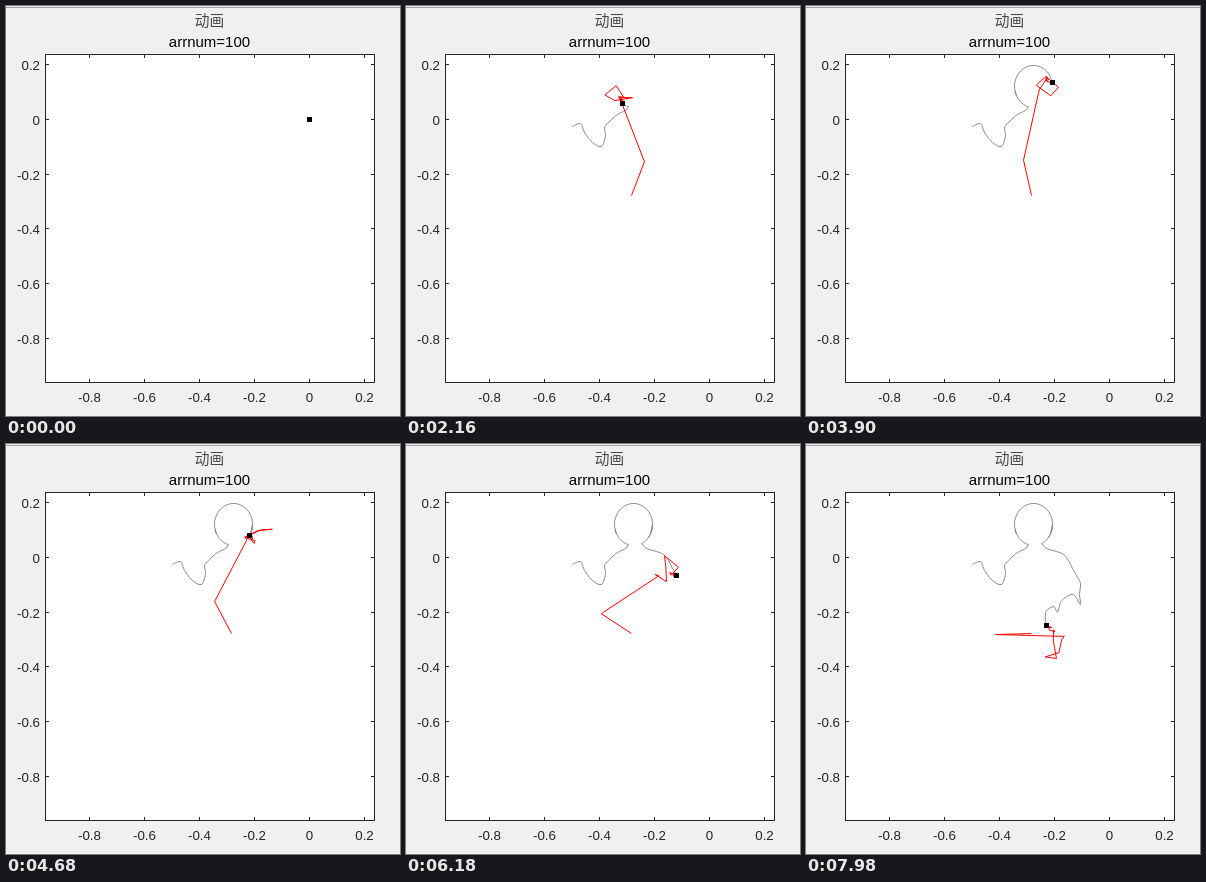
These frames come from a looping animation (394x410 px, 8000 ms). An HTML page with a canvas:

```html
<!DOCTYPE html>
<html lang="zh">
<head>
<meta charset="utf-8">
<style>
  html, body { margin: 0; width: 100%; height: 100%; overflow: hidden; background: #f0f0f0; }
  canvas { display: block; }
</style>
</head>
<body>
<canvas id="stage" width="394" height="410"></canvas>
<script>
const ctx = document.getElementById('stage').getContext('2d');
const LOOP = 8000, STEP = 60, LAST = 133;
const OMEGA = 2 * Math.PI / 310; // slowest arm, radians per step
const ORIGIN = [303, 113], SCALE = [274.4, 273.5];
const RAD = Math.PI / 180;

// Outline: left arm, then the head as an ellipse, then the right side.
const HEAD_START = 31, HEAD_END = 85, KEY_GAP = 3, HEAD_GAP = 9;
const leftArm = [
  [166,120], [174,117], [178,126], [186,136], [195,140], [199,129],
  [198,121], [203,115], [211,108], [219,104], [222,100]
];
const headAngles = [-165, -118, -47, 24, 92, 115, 155]; // degrees from the top
const rightSide = [
  [235,99], [240,104], [250,107], [257,110], [262,116], [266,124], [270,131], [274,139], [273,150],
  [274,160], [267,150], [259,153], [254,158], [251,168], [247,162], [239,168], [240,181]
];

// Arms turning at 1, -1, 2, -2, ... times OMEGA: [length, angle in degrees at step LAST].
const CENTER = [225, 189];
const mainArms = [
  [36.2, 181.7], [69, -1.5], [4, 230], [13.5, -102],
  [14.5, 197], [11.5, -8], [18, 100], [11, 88]
];
const SMALL_ARMS = 8;

const lerp = (a, b, t) => a + (b - a) * t;
const frequency = i => i % 2 ? -(i + 1) / 2 : i / 2 + 1;
const step = ([x, y], length, angle) =>
  [x + length * Math.cos(angle), y - length * Math.sin(angle)];

// Catmull-Rom curve through equally spaced values.
function spline(values, u) {
  const i = Math.min(Math.floor(u), values.length - 2), t = u - i;
  const at = j => values[Math.max(0, Math.min(values.length - 1, j))];
  const a = at(i - 1), b = at(i), c = at(i + 1), d = at(i + 2);
  return b + t / 2 * (c - a + t * (2 * a - 5 * b + 4 * c - d + t * (3 * (b - c) + d - a)));
}
const splinePoint = (keys, u) => [0, 1].map(axis => spline(keys.map(p => p[axis]), u));

function headPoint(n) {
  const angle = spline(headAngles, (n - HEAD_START) / HEAD_GAP);
  // The pen scribbles back and forth at the ears.
  const ear = Math.max(0, 1 - Math.abs(Math.abs(angle) - 108) / 25);
  const a = (angle + 14 * ear * Math.sin(1.9 * n)) * RAD;
  return [227 + 19 * Math.sin(a), 80 - 21 * Math.cos(a)];
}

function penPoint(n) {
  if (n <= HEAD_START) return splinePoint(leftArm, (n - 1) / KEY_GAP);
  if (n < HEAD_END) return headPoint(n);
  return splinePoint(rightSide, (n - HEAD_END) / KEY_GAP);
}

function armJoints(n) {
  const joints = [CENTER];
  mainArms.forEach(([length, degrees], i) => {
    joints.push(step(joints[i], length, degrees * RAD + frequency(i) * OMEGA * (n - LAST)));
  });
  // Small arms curl from the last big joint to the pen.
  const end = joints[mainArms.length], pen = penPoint(n);
  for (let i = 1; i <= SMALL_ARMS; i++) {
    const t = i / SMALL_ARMS;
    const base = [lerp(end[0], pen[0], t), lerp(end[1], pen[1], t)];
    const spin = frequency(i + mainArms.length) * OMEGA * n;
    joints.push(step(base, 4 * (1 - t), spin));
  }
  return joints;
}

const trace = Array.from({ length: LAST }, (_, i) => penPoint(i + 1));

function polyline(points, color) {
  ctx.strokeStyle = color;
  ctx.beginPath();
  for (const [x, y] of points) ctx.lineTo(x + 0.5, y + 0.5);
  ctx.stroke();
}

function text(str, x, y, size, align, color) {
  ctx.font = `${size}px "Liberation Sans", "Noto Sans CJK SC", "Noto Sans CJK", sans-serif`;
  ctx.textAlign = align;
  ctx.fillStyle = color;
  ctx.fillText(str, x, y);
}

function drawAxes() {
  const left = 39, right = 368, top = 48, bottom = 376, ink = '#262626';
  ctx.fillStyle = '#f0f0f0';
  ctx.fillRect(0, 0, 394, 410);
  ctx.fillStyle = '#a0a0a0';
  ctx.fillRect(0, 1, 394, 1);
  ctx.fillStyle = '#fff';
  ctx.fillRect(left, top, right - left, bottom - top);
  ctx.strokeStyle = ink;
  ctx.strokeRect(left + 0.5, top + 0.5, right - left, bottom - top);
  for (let i = -4; i <= 1; i++) {
    const label = String(i / 5);
    const x = Math.round(ORIGIN[0] + SCALE[0] * i / 5);
    const y = Math.round(ORIGIN[1] - SCALE[1] * i / 5);
    ctx.fillStyle = ink;
    ctx.fillRect(x, top, 1, 4);
    ctx.fillRect(x, bottom - 3, 1, 4);
    ctx.fillRect(left, y, 4, 1);
    ctx.fillRect(right - 3, y, 4, 1);
    text(label, x + 0.5, 396, 13.33, 'center', ink);
    text(label, 34, y + 6, 13.33, 'right', ink);
  }
  text('动画', 203.5, 20, 14.67, 'center', '#484848');
  text('arrnum=100', 203.5, 41, 15, 'center', '#000');
}

function draw(time) {
  const n = Math.floor(time % LOOP / STEP);
  drawAxes();
  if (n > 0) {
    polyline(trace.slice(0, n), '#8c8c8c');
    polyline(armJoints(n), '#f00');
  }
  const [x, y] = n > 0 ? penPoint(n) : ORIGIN;
  ctx.fillStyle = '#000';
  ctx.fillRect(Math.round(x) - 2, Math.round(y) - 2, 5, 5);
}

const start = performance.now();
function tick() {
  draw(performance.now() - start);
  requestAnimationFrame(tick);
}
tick();
</script>
</body>
</html>
```
